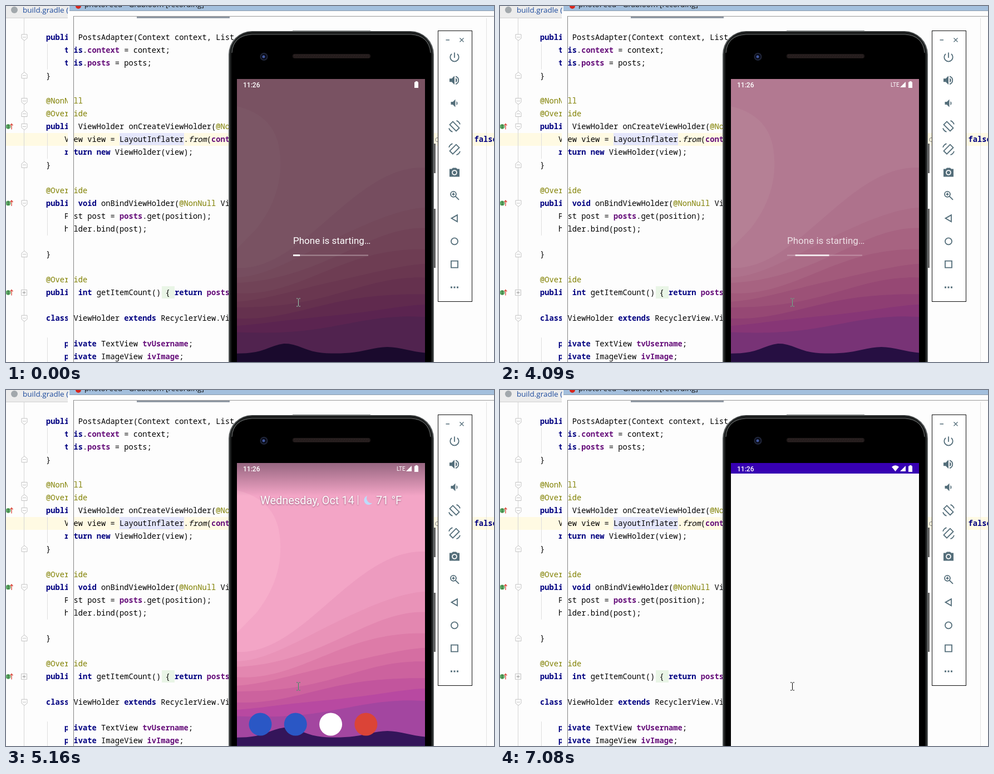
An HTML page with a canvas for the animation above (8000 ms loop, 877 by 639 pixels).

```html
<!DOCTYPE html>
<html lang="en">
<head>
<meta charset="utf-8">
<title>Emulator start</title>
<style>
html, body { margin: 0; width: 100%; height: 100%; overflow: hidden; }
canvas { display: block; }
</style>
</head>
<body>
<canvas id="stage" width="877" height="639"></canvas>
<script>
const c = document.getElementById('stage').getContext('2d');
const LOOP = 8000, TICK = 130.8, SLATE = '#546e7a';
const MONO = '13.75px "Noto Sans Mono", "DejaVu Sans Mono", monospace';
const SANS = '13.5px "Open Sans", "Noto Sans", sans-serif';

const CODE = `public PostsAdapter(Context context, List
    this.~context = context;
    this.~posts = posts;
}

@NonNull
@Override
public ViewHolder onCreateViewHolder(@NonNull
    View view = LayoutInflater./from(~context
    return new ViewHolder(view);
}

@Override
public void onBindViewHolder(@NonNull View
    Post post = ~posts.get(position);
    holder.bind(post);

}

@Override
public int getItemCount() { return ~posts

class ViewHolder extends RecyclerView.View

    private TextView ~tvUsername;
    private ImageView ~ivImage;`.split('\n');
const KEYWORD = /^(public|this|return|new|void|int|class|extends|private)$/;

const ROTATE = 'M-3-8.5L8.5 3L3 8.5L-8.5-3ZM3.5-10A10.5 10.5 0 0 1 10-3.5M-3.5 10A10.5 10.5 0 0 1-10 3.5';
// Toolbar buttons from the top: [stroked path, filled path]
const BUTTONS = [
  ['M0-8.5V1M-5-6A7.7 7.7 0 1 0 5-6'],
  ['M2-7A7.3 7.3 0 0 1 2 7', 'M-9-3H-5L0-8V8L-5 3H-9ZM2-4A4.3 4.3 0 0 1 2 4Z'],
  ['', 'M-6.5-2.5H-3L1.5-7V7L-3 2.5H-6.5ZM3.5-3.5A4 4 0 0 1 3.5 3.5Z'],
  [ROTATE],
  [ROTATE.replace('8.5L8.5 3L3 8.5L-8.5-3Z', '8.5L-8.5 3L-3 8.5L8.5-3Z').replace('M-3-', 'M3-')
    .replace('M3.5-10A10.5 10.5 0 0 1 10-3.5', 'M-3.5-10A10.5 10.5 0 0 0-10-3.5')
    .replace('M-3.5 10A10.5 10.5 0 0 1-10 3.5', 'M3.5 10A10.5 10.5 0 0 0 10 3.5')],
  ['', 'M-9-6H-5L-3-8H3L5-6H9V8H-9Z'],
  ['M3-2A5 5 0 1 1-7-2A5 5 0 1 1 3-2M2 2L8 8M-4.5-2H.5M-2-4.5V.5'],
  ['M5-6V6L-5.5 0Z'],
  ['M6 0A6 6 0 1 1-6 0A6 6 0 1 1 6 0'],
  ['M-6-6H6V6H-6Z'],
  ['', 'M-7-1.5h3v3h-3ZM-1.5-1.5h3v3h-3ZM4-1.5h3v3h-3Z']
];

const mix = (a, b, p) => a + (b - a) * p;
const clamp = p => Math.max(0, Math.min(1, p));
const rowY = row => 56 + row * 22.92;

function rect(color, x, y, w, h) {
  c.fillStyle = color;
  c.fillRect(x, y, w, h);
}

function rounded(color, x, y, w, h, radii) {
  c.fillStyle = color;
  c.beginPath();
  c.roundRect(x, y, w, h, radii);
  c.fill();
}

function disc(color, x, y, r) {
  c.fillStyle = color;
  c.beginPath();
  c.arc(x, y, r, 0, 7);
  c.fill();
}

function text(str, x, y, font, color) {
  c.font = font;
  c.fillStyle = color;
  c.fillText(str, x, y);
}

function shape(x, y, d, fill, stroke, width = 1) {
  const p = new Path2D(d);
  c.save();
  c.translate(x, y);
  if (fill) { c.fillStyle = fill; c.fill(p); }
  if (stroke) { c.strokeStyle = stroke; c.lineWidth = width; c.stroke(p); }
  c.restore();
}

function layer(alpha, draw) {
  c.save();
  c.globalAlpha = alpha;
  draw();
  c.restore();
}

function gutter(line, row) {
  const y = rowY(row), before = CODE[row - 1];
  if (/^ /.test(line)) rect('#dedede', 74, y - 11, 1, 23);
  if (/{/.test(line)) {
    shape(32.5, y, 'M-5-5H5V5H-5Z', '#fff', '#c2c2c2');
    shape(32.5, y, 'M-3 0H3M0-3V3', null, '#999');
  } else if (/^(public|class|@NonNull)/.test(line)) {
    shape(33, y, 'M-5-5H5V2L0 6L-5 2ZM-3 0H3', '#fff', '#c2c2c2');
  } else if (line === '}' || before === '@NonNull') {
    shape(33, y, 'M-5 5H5V-2L0-6L-5-2ZM-3 0H3', '#fff', '#c2c2c2');
  }
  if (before === '@Override') {
    disc('#62b06a', 4, y, 4.5);
    shape(4, y, 'M-1.5-2.5H1.5M0-2.5V2.5M-1.5 2.5H1.5', null, '#2f5b35');
    shape(10, y, 'M0 5V-4M-2.5-2L0-5L2.5-2', null, '#d9483b', 1.3);
  }
}

function codeLine(line, row) {
  let x = 72;
  for (const token of line.match(/[@~/]?\w+|\W/g) || []) {
    const word = token.replace(/^[~/]/, '');
    let color = '#000', style = '';
    if (token[0] === '~') { color = '#660e7a'; style = 'bold '; }
    else if (token[0] === '@') color = '#808000';
    else if (token[0] === '/') style = 'italic ';
    else if (KEYWORD.test(word)) { color = '#000080'; style = 'bold '; }
    text(word, x, rowY(row) + 4.8, style + MONO, color);
    x += word.length * 8.25;
  }
}

function editor() {
  rect('#fdfdfd', 0, 0, 877, 639);
  rect('#fffae3', 0, 228, 877, 23);
  rect('#e4e6fb', 204, 228, 116, 22);
  rect('#e9f5e6', 280, 503, 23, 22);
  rect('#d4d4d4', 32, 22, 1, 617);
  rect('#e2e2e2', 863, 22, 1, 617);
  CODE.forEach(gutter);
  CODE.forEach(codeLine);
  text('ac', 762, 244, MONO, '#999');
  text('false', 841.5, 244, 'bold ' + MONO, '#000080');

  // Tab and the recorder window's frame
  rect('#ececec', 0, 0, 113, 21);
  rect('#d0d0d0', 0, 21, 113, 1);
  disc('#a2a8ac', 15, 7, 6);
  text('build.gradle (', 30, 12, SANS, '#1d4b9e');
  rect('#fdfdfd', 111, 8, 11, 631);
  rect('#fdfdfd', 111, 8, 766, 14);
  rect('#a3bfdd', 114, 0, 763, 8);
  rect('#8b9cad', 114, 8, 763, 1);
  rect('#9a9a9a', 121, 18, 756, 1);
  rect('#8f98a3', 235, 19, 167, 3);
  rect('#858585', 121, 18, 1, 621);
  disc('#d8261c', 130, 0, 5);
  text('photoFeed - Grabloom [recording]', 141, 1.5, SANS, '#111');
}

function phone() {
  rect('#666', 767, 247, 5, 53);
  rect('#666', 767, 364, 5, 106);
  rounded('#565a5b', 400, 45, 369, 680, [42, 42, 0, 0]);
  rounded('#1c1e1e', 402, 46, 365, 680, [41, 41, 0, 0]);
  rounded('#000', 405, 50, 359, 680, [38, 38, 0, 0]);
  shape(0, 0, 'M406 84Q408 53 442 51H728Q760 53 763 84', null, '#777b7b');
  rect('#787c7c', 515, 44, 140, 2);

  disc('#20263a', 463.5, 91, 7);
  disc('#090b18', 463.5, 91, 5);
  disc('#4259a0', 463, 91, 2.5);
  rounded('#211a1a', 515, 86, 140, 8, 4);
  for (let x = 518; x < 653; x += 3) {
    rect('#4a3a3a', x, 88, 1, 1);
    rect('#4a3a3a', x + 1, 91, 1, 1);
  }
}

function toolbar() {
  rect('#fff', 776, 44, 62, 487);
  c.strokeStyle = '#111';
  c.lineWidth = 1;
  c.strokeRect(776.5, 44.5, 61, 486);
  shape(806, 61, 'M-15.5 0H-9M9.5-3.5L16.5 3.5M16.5-3.5L9.5 3.5', null, SLATE, 1.3);
  BUTTONS.forEach(([line, solid], i) => {
    const y = 92 + i * 41.3;
    shape(806, y, line, null, SLATE, 1.8);
    if (solid) shape(806, y, solid, SLATE);
  });
  disc('#fff', 806, 299, 4.8);
  disc(SLATE, 806, 299, 3);
}

// Fills the screen below a curve; x runs from 0 to 1.
function below(color, curve) {
  c.fillStyle = color;
  c.beginPath();
  c.moveTo(415, 639);
  for (let i = 0; i <= 40; i++) c.lineTo(415 + 338 * i / 40, curve(i / 40));
  c.lineTo(753, 639);
  c.fill();
}

function wallpaper() {
  rect('#f3a5c6', 415, 131, 338, 508);
  shape(0, 0, 'M415 180Q478 195 490 250Q505 330 450 400L415 436Z', '#f7aecb');
  for (let u = 0; u <= 1; u += 1 / 9) {
    const left = mix(470, 603, u), right = mix(288, 580, u ** .63);
    const color = `hsl(${334 - 46 * u ** 3} ${70 - 34 * u}% ${77 - 36 * u ** 1.2}%)`;
    below(color, x => mix(left, right, x * x * (3 - 2 * x)) + 3 * Math.sin(x * 7 + u * 20));
  }
  const hill = (x, peak, width) => Math.exp(-(((x - peak) / width) ** 2));
  below('#34155a', x => 624 - 18 * hill(x, .26, .12) - 12 * hill(x, .8, .14));
}

// One sweep of the progress bar: the right end eases out, the left end eases in.
function sweep(p) {
  if (p <= 0 || p >= 1) return;
  const left = 135 * p ** 2.5, right = 135 * (1 - (1 - p) ** 1.55);
  rect('#fff', 516 + left, 446, right - left, 3);
}

function starting(t) {
  text('Phone is starting…', 516, 426.5, '17px Roboto, sans-serif', '#fff');
  rect('rgba(255,255,255,.35)', 516, 446.5, 135, 2);
  const clock = t < 670 ? t / 12 : t; // sluggish at first
  const phase = (clock + 60) % 1860;
  sweep(phase / 1020);
  sweep((phase - 760) / 860);
}

function home() {
  const scrim = c.createLinearGradient(0, 131, 0, 190);
  scrim.addColorStop(0, 'rgba(60,40,60,.5)');
  scrim.addColorStop(1, 'rgba(60,40,60,0)');
  rect(scrim, 415, 131, 338, 59);
  c.save();
  c.shadowColor = 'rgba(70,30,60,.6)';
  c.shadowBlur = 3;
  c.shadowOffsetY = 1;
  text('Wednesday, Oct 14', 457, 205, '20px Roboto, sans-serif', '#fff');
  text('71 °F', 665, 205, '20px Roboto, sans-serif', '#fff');
  rect('#fff', 632, 189, 1, 17);
  c.restore();
  shape(651, 198, 'M-2-8A8.2 8.2 0 1 0 7 5A9 9 0 0 1-2-8Z', '#bcdcfb');
  ['#2a57c5', '#2a57c5', '#fff', '#db4437'].forEach((color, i) => disc(color, 457 + i * 63.3, 600, 20.5));
}

// The app grows from its centre in three steps.
function appWindow(now) {
  const rest = (1 - clamp(Math.floor((now - 6390) / 130) / 2)) ** 3;
  const scale = 1 - .15 * rest;
  layer(1 - .54 * rest, () => {
    c.translate(584, 431.5);
    c.scale(scale, scale);
    rect('#fafafa', -169, -281.5, 338, 582);
    rect('#3700b3', -169, -300.5, 338, 19);
  });
}

function statusBar(now) {
  text('11:26', 426, 145.5, '500 12px Roboto, sans-serif', '#fff');
  shape(0, 0, 'M734 136.5H736V135H739.5V136.5H741V147H734Z', '#fff');
  if (now >= 1060) shape(0, 0, 'M719 146H729V136Z', '#fff');
  if (now >= 7080) shape(0, 0, 'M710.5 146L704 138Q710.5 132.5 717 138Z', '#fff');
  else if (now >= 1870) text('LTE', 702, 144.5, '10px Roboto, sans-serif', '#fff');
}

function screen(now) {
  const t = Math.max(0, 24 + TICK * Math.floor((now - 24) / TICK));
  const light = clamp((t - 3850) / 490);
  c.save();
  c.beginPath();
  c.rect(415, 131, 338, 508);
  c.clip();
  wallpaper();
  rect(`rgba(0,0,0,${.5 * (1 - light)})`, 415, 131, 338, 508);
  layer(1 - light ** 2, () => starting(t));
  if (now >= 5040) layer(now < 5160 ? .5 : 1, home);
  if (now >= 6390) appWindow(now);
  statusBar(now);

  // Text cursor inverts what lies below it.
  c.globalCompositeOperation = 'difference';
  shape(525.5, 532, 'M-3.5-7H-1M1-7H3.5M0-6.5V6.5M-3.5 7H-1M1 7H3.5', null, '#fff');
  c.restore();
}

function frame() {
  editor();
  phone();
  screen(performance.now() % LOOP);
  toolbar();
  requestAnimationFrame(frame);
}
frame();
</script>
</body>
</html>
```
